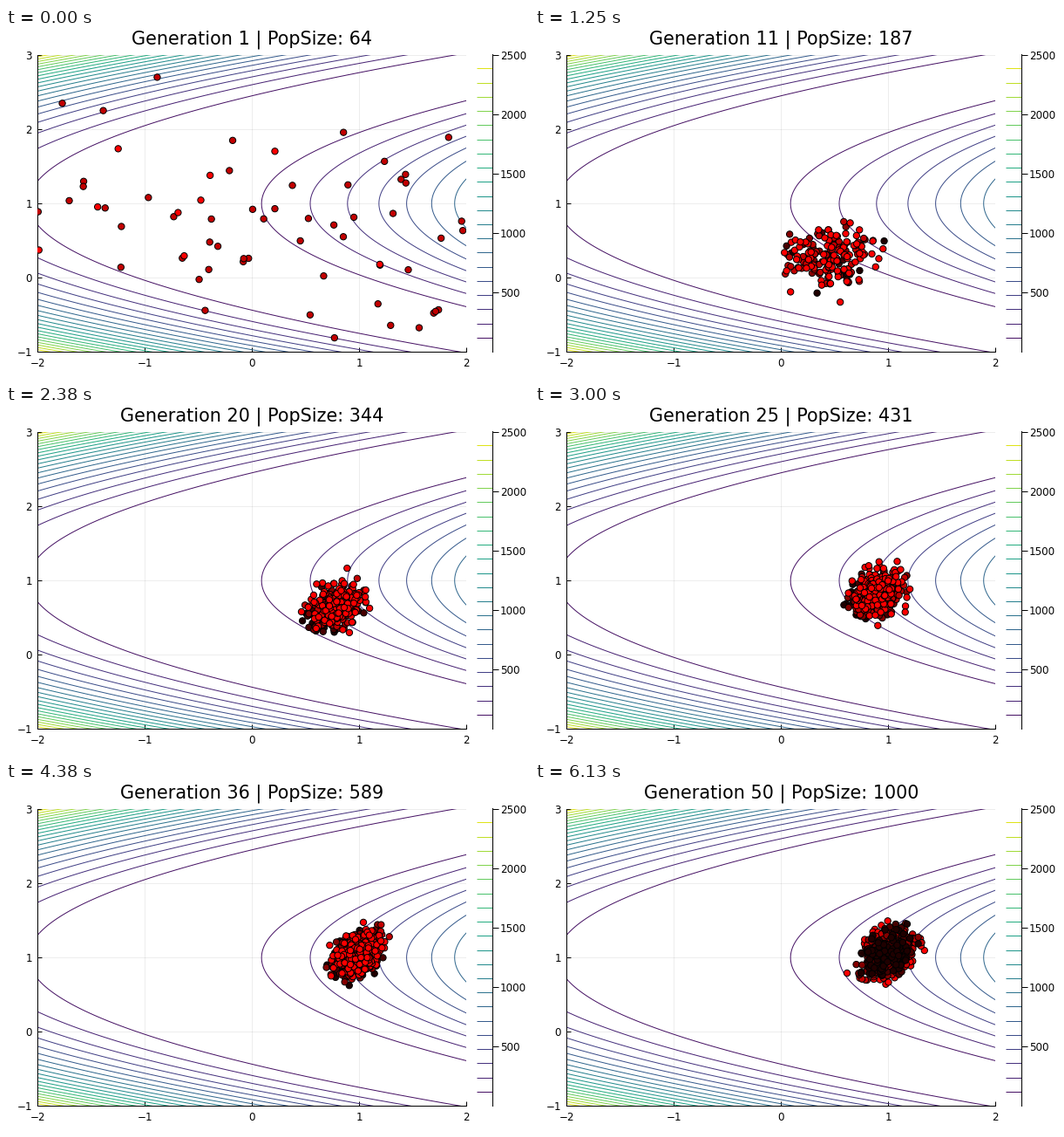
Write a matplotlib script that moves like this. It is 600 px wide and 400 px high and loops after 6.26 s.

```python
import numpy as np
import matplotlib.pyplot as plt
from matplotlib.animation import FuncAnimation

W, H, DPI = 600, 400, 100
LEFT, RIGHT, TOP, BOTTOM = 36.4, 528.2, 30.5, 371.4
PT = 72 / DPI

LOOP_MS, STEP_MS, GENERATION_MS = 6260, 20, 125
GENERATIONS = 50
KEY_GENERATIONS = [1, 7, 15, 25, 36, 44, 50]
KEY_SIZES = [64, 117, 257, 431, 589, 772, 1000]


def rosenbrock(u, v):
    return (1 - u) ** 2 + 100 * (v - u ** 2) ** 2


def pop_size(gen):
    return round(np.interp(gen, KEY_GENERATIONS, KEY_SIZES))


def swarm_at(gen):
    """Centre and shape matrix of the swarm as it slides along y = x²."""
    progress = min((gen - 1) / 35, 1)
    cx = 1 - (1 - progress) ** 2
    sx = 0.105 + 0.9 * np.exp((1 - gen) / 4.5)
    sy = 0.145 + 0.8 * np.exp((1 - gen) / 3.2)
    corr = 0.4 * progress
    shape = np.array([[sx, 0], [corr * sy, sy * np.sqrt(1 - corr ** 2)]])
    return np.array([cx, cx ** 2 + 0.05]), shape


def evolve():
    """All generations as arrays of x, y, birth."""
    rng = np.random.default_rng(5)
    size = pop_size(1)
    births = rng.random(size) < 0.18
    swarm = np.column_stack([rng.uniform(-2, 2, size),
                             rng.triangular(-1, 0.6, 3, size), births])
    history = [swarm]
    for gen in range(2, GENERATIONS + 1):
        centre, shape = swarm_at(gen)
        offset = np.linalg.solve(shape, (swarm[:, :2] - centre).T)
        fit = np.hypot(*offset) < 3
        swarm = swarm[fit & (rng.random(len(swarm)) < 0.6)]
        z = rng.normal(size=(pop_size(gen) - len(swarm), 2))
        children = np.column_stack([centre + z @ shape.T, np.full(len(z), gen)])
        swarm = np.vstack([swarm, children])
        history.append(swarm)
    return history


def add_axes(left, right, lift=0):
    return fig.add_axes([left / W, 1 - (BOTTOM - lift) / H,
                         (right - left) / W, (BOTTOM - TOP) / H])


plt.rcParams["font.family"] = "DejaVu Sans"
fig = plt.figure(figsize=(W / DPI, H / DPI), dpi=DPI, facecolor="white")
tick_style = dict(labelsize=11.9 * PT, width=PT)

ax = add_axes(LEFT, RIGHT)
ax.set(xlim=(-2, 2), ylim=(-1, 3), xticks=range(-2, 3), yticks=range(-1, 4))
ax.tick_params(direction="in", pad=6.5 * PT, length=5 * PT, **tick_style)
ax.spines[["top", "right"]].set_visible(False)
ax.spines[["left", "bottom"]].set_linewidth(PT)
ax.set_axisbelow(True)
ax.grid(color="black", alpha=0.07, linewidth=PT)

x, y = np.meshgrid(np.linspace(-2, 2, 161), np.linspace(-1, 3, 161))
PEAK = rosenbrock(-2, -1)
levels = np.linspace(0, PEAK, 22)[1:-1]
ax.contour(x, y, rosenbrock(y - 1, x + 1), levels=levels, cmap="viridis",
           vmin=0, vmax=PEAK, linewidths=PT)

bar = add_axes(540, 558, lift=0.3)
bar.set(xlim=(0, 1), ylim=(0, PEAK), xticks=[], yticks=range(500, 2501, 500))
bar.yaxis.tick_right()
bar.tick_params(direction="out", pad=2 * PT, length=7 * PT, **tick_style)
bar.spines[["top", "left", "bottom"]].set_visible(False)
bar.spines["right"].set_linewidth(PT)
bar.hlines(levels, 0, 1, colors=plt.cm.viridis(levels / PEAK), linewidths=PT)

title = fig.text(282.3 / W, 1 - 18 / H, "", ha="center", va="baseline",
                 fontsize=20.8 * PT)
dots = ax.scatter([], [], s=(7.3 * PT) ** 2, linewidths=PT, edgecolors="black",
                  zorder=3)
history = evolve()


def update(frame):
    middle = (frame + 0.5) * STEP_MS
    gen = min(int(middle // GENERATION_MS) + 1, GENERATIONS)
    people = history[gen - 1]
    age = gen - people[:, 2]
    # The last generation is stacked with its eldest on top
    order = np.argsort(age if gen == GENERATIONS else -age, kind="stable")
    red = np.clip(1 - 0.24 * age[order], 0.12, 1)
    dots.set_offsets(people[order, :2])
    dots.set_facecolors(np.column_stack([red, 0 * red, 0 * red]))
    title.set_text(f"Generation {gen} | PopSize: {pop_size(gen)}")
    return dots, title


anim = FuncAnimation(fig, update, frames=LOOP_MS // STEP_MS, interval=STEP_MS,
                     repeat=True, repeat_delay=0)
plt.show()
```
